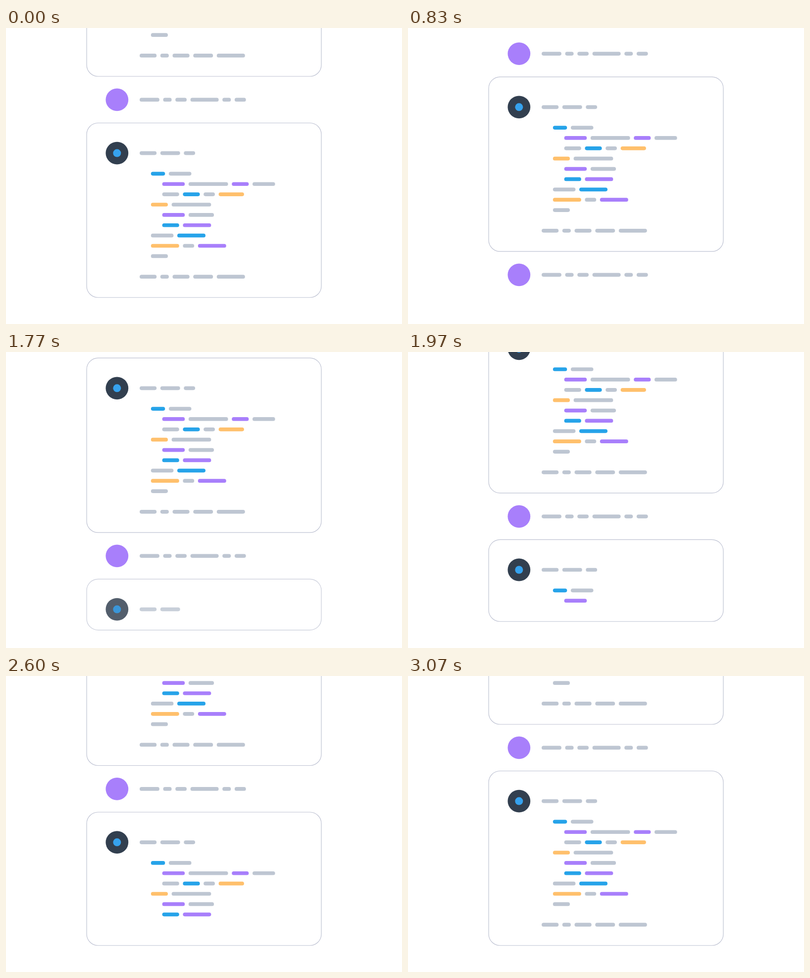
Write an HTML page with a canvas that moves like this. It is 800 by 600 pixels and loops after 4.1 s.

```html
<!DOCTYPE html>
<html lang="en">
<head>
<meta charset="utf-8">
<title>Chat with code replies</title>
<style>
  html, body { margin: 0; height: 100%; overflow: hidden; background: #fff; }
  canvas { display: block; }
</style>
</head>
<body>
<canvas id="stage" width="800" height="600"></canvas>
<script>
const ctx = document.getElementById('stage').getContext('2d');
const LOOP = 4100, FPS = 30;
const LINE = 20.88, UNIT = 5.7, GAP = 7.6;
const PROMPT_SCROLL = 93.3, REPLY_SCROLL = 5 * LINE;
const PERIOD = PROMPT_SCROLL + REPLY_SCROLL + 12 * LINE;
const COLORS = { g: '#bec6d2', p: '#a87ffb', b: '#26a3e9', o: '#ffc06c' };

// Each word is a colour letter and a length; the first number is the indent.
const parse = text => {
  const [indent, ...words] = text.split(' ');
  return { x: 270 + indent * 4 * UNIT, words: words.map(w => [COLORS[w[0]], w.slice(1) * UNIT]) };
};
const PROMPT = parse('0 g7 g3 g4 g10 g3 g4');
const REPLY = [
  '0 g6 g7 g4',
  '1 b5 g8',
  '2 p8 g14 p6 g8',
  '2 g6 b6 g4 o9',
  '1 o6 g14',
  '2 p8 g9',
  '2 b6 p10',
  '1 g8 b10',
  '1 o10 g4 p10',
  '1 g6',
  '0 g6 g3 g6 g7 g10'
].map(parse);
const PROMPT_TIMES = [10, 11, 13, 15, 17, 20];

const clamp = v => Math.max(0, Math.min(1, v));
const row = i => i + (i > 0) + (i > 9);

function circle(x, y, r, color) {
  ctx.fillStyle = color;
  ctx.beginPath();
  ctx.arc(x, y, r, 0, 2 * Math.PI);
  ctx.fill();
}

// Draws the first `count` words and returns the right end of the last one.
function drawWords(line, y, count) {
  let x = line.x, end = x;
  for (const [color, width] of line.words.slice(0, count)) {
    ctx.fillStyle = color;
    ctx.beginPath();
    ctx.roundRect(x, y - 3.85, width, 7.7, 3.85);
    ctx.fill();
    end = x + width;
    x = end + GAP;
  }
  return end;
}

// One typing step is a word or a line break.
function typed(steps) {
  const counts = [];
  for (let i = 0; i < REPLY.length; i++) {
    if (i && --steps < 0) break;
    const n = Math.min(steps, REPLY[i].words.length);
    counts.push(n);
    steps -= n;
  }
  return counts;
}

function drawPrompt(y, count, cursor) {
  circle(224.3, y, 22.9, COLORS.p);
  const end = drawWords(PROMPT, y, count);
  if (cursor) {
    ctx.fillStyle = '#9f78f0';
    ctx.fillRect(end + 1.7, y - 9, 2, 18);
  }
}

function drawReply(y, counts) {
  const top = y - 61.1;
  const bottom = y + row(counts.length - 1) * LINE + 42.1;
  ctx.strokeStyle = '#bfc3d3';
  ctx.lineWidth = 1.2;
  ctx.beginPath();
  ctx.roundRect(163, top, 474, bottom - top, 23);
  ctx.stroke();
  circle(224.3, y, 22.9, '#323f4f');
  circle(224.3, y, 8, '#36a2ee');
  counts.forEach((n, i) => drawWords(REPLY[i], y + row(i) * LINE, n));
}

function draw(time) {
  const frame = Math.floor((time + 4) * FPS / 1000);
  const enterPrompt = clamp((frame - 3) / 6);
  const enterReply = clamp((frame - 48) / 6);
  const counts = typed(Math.max(0, frame - 51 - (frame >= 70)));
  const scroll = PROMPT_SCROLL * enterPrompt + REPLY_SCROLL * enterReply
    + row(counts.length - 1) * LINE;
  const full = REPLY.map(line => line.words.length);
  const y = 145.4 - scroll;

  ctx.clearRect(0, 0, 800, 600);
  ctx.save();
  ctx.beginPath();
  ctx.rect(0, 0, 800, 570);
  ctx.clip();
  if (frame < 25) drawReply(y - PERIOD + 108.2, full);
  drawPrompt(y, 6);
  drawReply(y + 108.2, full);
  ctx.globalAlpha = enterPrompt;
  drawPrompt(y + PERIOD, PROMPT_TIMES.filter(t => t <= frame).length, frame >= 9 && frame < 25);
  ctx.globalAlpha = enterReply;
  drawReply(y + PERIOD + 108.2, counts);
  ctx.restore();
}

const start = performance.now();
function tick() {
  draw((performance.now() - start) % LOOP);
  requestAnimationFrame(tick);
}
tick();
</script>
</body>
</html>
```
